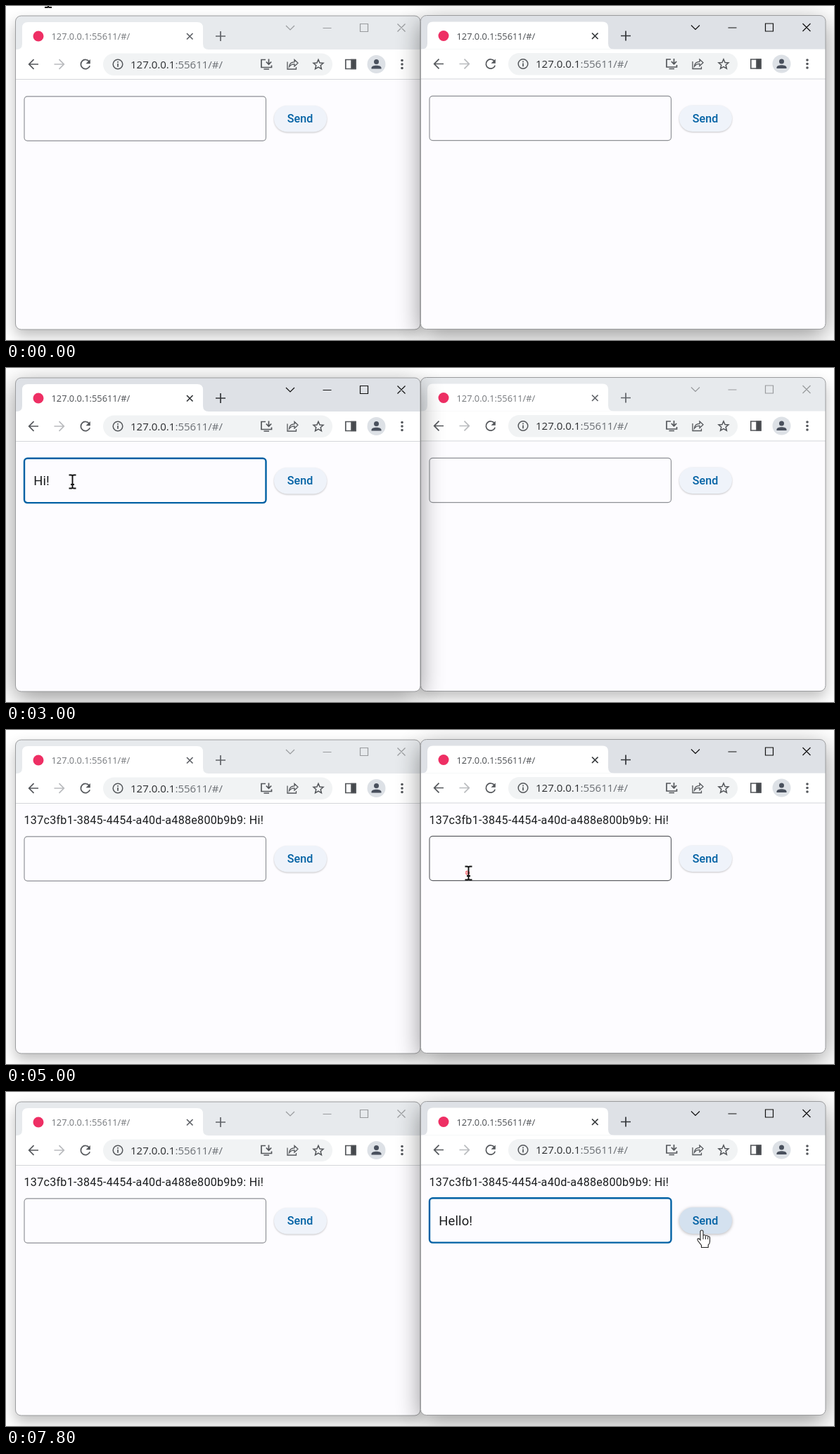
Animation, 1177 px wide and 476 px high, one loop 8000 ms. Source, as an HTML page:

```html
<!DOCTYPE html>
<html lang="en">
<head>
<meta charset="utf-8">
<title>Chat in two windows</title>
<style>
  html, body { margin: 0; width: 100%; height: 100%; overflow: hidden; background: #fff; }
  svg { display: block; width: 1177px; height: 476px; }
  text { white-space: pre; }
  .shadow { filter: blur(10px); opacity: .26; }
  .active .shadow { filter: blur(17px); opacity: .42; }
  .bar { fill: #e7eaed; }
  .active .bar { fill: #dee1e6; }
  .icon { fill: none; stroke: #54575b; stroke-width: 1.7; }
  .ctl { fill: none; stroke: #999b9e; stroke-width: 1.2; }
  .active .ctl { stroke: #111; }
  .tabmark { fill: none; stroke: #606368; stroke-width: 1.7; }
  .active .tabmark { stroke: #333639; }
  .url { font-family: "Open Sans", "Noto Sans", sans-serif; }
  .tabtext { font-size: 12.8px; fill: #74777b; }
  .active .tabtext { fill: #4a4d51; }
  .address { font-size: 15px; fill: #6a6e73; }
  .host { fill: #2b2d30; }
  .app { font-family: Roboto, "Noto Sans", sans-serif; fill: #1a1c1e; }
  .message { font-size: 16.1px; letter-spacing: .27px; }
  .typed { font-size: 18.4px; letter-spacing: .17px; }
  .label { font-size: 16.1px; font-weight: 500; letter-spacing: .1px; fill: #0061a4; }
  .field { fill: none; stroke: #8e9095; stroke-width: 1.15; }
  .field.hover { stroke: #5f6166; }
  .field.focus { stroke: #0061a4; stroke-width: 2.4; }
  .caret { fill: #0061a4; }
  .button { fill: #eff3fa; filter: drop-shadow(0 1px 1px rgba(0, 0, 0, .22)); }
  .button.hover { fill: #d4e1ef; filter: drop-shadow(0 1.5px 2px rgba(0, 0, 0, .28)); }
  .ripple { fill: #ff5a62; fill-opacity: .5; stroke: #f0323c; stroke-width: 1; stroke-dasharray: 3 1.5; }
</style>
</head>
<body>
<svg id="stage" viewBox="0 0 1177 476" xmlns="http://www.w3.org/2000/svg">
  <defs>
    <g id="chrome">
      <circle cx="46" cy="43" r="7.5" fill="#ee2f64"/>
      <g class="icon">
        <path d="M46 83H33M39.5 76.2L32.7 83L39.5 89.8"/>
        <path d="M68.500 83H82M75.500 76.200L82.300 83L75.500 89.800" stroke="#b9bbbe"/>
        <path d="M118.300 79.200A6.600 6.600 0 1 0 119.200 85.200"/>
        <path d="M119.800 76v6.300h-6.300z" fill="#54575b" stroke="none"/>
        <circle cx="159" cy="83" r="6.800" stroke-width="1.500"/>
        <path d="M159 82v4.800M159 79v1.700"/>
        <path d="M369 76.500H363V87.500H377.500V84.500M366.500 90H374" />
        <path d="M373.500 75.500V82.500M369.800 79.500L373.500 83.200L377.200 79.500"/>
        <path d="M400 79.500V90H412.500V87M402.500 86.500C403 82 406 79.800 410 79.800V76.500L415 81.300L410 86V82.800C406.500 82.800 404.300 84 402.500 86.500Z" stroke-width="1.300"/>
        <path d="M444 76.300L446 81L451 81.400L447.200 84.700L448.400 89.600L444 87L439.600 89.600L440.800 84.700L437 81.400L442 81Z" stroke-width="1.500"/>
        <path d="M482.800 76.500H496.800V89.500H482.800Z"/>
        <path d="M491 76.500H497V89.500H491Z" fill="#45484c"/>
      </g>
      <circle cx="526.500" cy="83" r="13" fill="#dde1e6"/>
      <circle cx="526.500" cy="79.500" r="3.500" fill="#49505d"/>
      <path d="M519.500 89.500V88C519.500 83.500 533.500 83.500 533.500 88V89.500Z" fill="#49505d"/>
      <g fill="#54575b">
        <circle cx="563" cy="77.500" r="1.800"/>
        <circle cx="563" cy="83" r="1.800"/>
        <circle cx="563" cy="88.500" r="1.800"/>
      </g>
    </g>
    <g id="beam">
      <path id="stem" d="M-5 -9.500H-2Q0 -9.500 0 -8Q0 -9.500 2 -9.500H5M0 -8V8M-5 9.500H-2Q0 9.500 0 8Q0 9.500 2 9.500H5M-2.500 4H2.500" fill="none" stroke="#111" stroke-width="1.900"/>
    </g>
    <g id="arrow">
      <path d="M.5 .5V18.300L4.600 14.500L7.700 21.500L10.600 20.200L7.600 13.400H13.400Z" fill="#fff" stroke="#222" stroke-width="1"/>
    </g>
    <g id="hand">
      <path d="M-1.500 14V2Q-1.500 0 .5 0Q2.500 0 2.500 2V8Q2.500 6.800 4.200 6.800Q6 6.800 6 8.800Q6 7.500 7.600 7.500Q9.200 7.500 9.200 9.500Q9.500 8.700 10.500 8.700Q12 8.700 12 10.800V16Q12 19 9.700 21V24.500H0V21.500L-5 15Q-6.200 13 -5 12Q-3.500 11.200 -1.500 14Z" fill="#fff" stroke="#222" stroke-width="1.100"/>
      <path d="M2.500 8V13M6 9V13M9.200 10V13" stroke="#222" fill="none"/>
    </g>
  </defs>
  <g id="windows"></g>
  <circle id="ripple" class="ripple"/>
  <use id="pointer"/>
</svg>
<script>
const LOOP = 8000, STEP = 200;
const MESSAGE = "137c3fb1-3845-4454-a40d-a488e800b9b9: Hi!";
const byId = id => document.getElementById(id);
const layer = byId("windows"), ripple = byId("ripple"), pointer = byId("pointer");

function makeWindow(x, y, id) {
  const g = document.createElementNS("http://www.w3.org/2000/svg", "g");
  g.setAttribute("transform", `translate(${x} ${y})`);
  g.innerHTML = `
    <rect class="shadow" x="13" y="23" width="576" height="447" rx="8"/>
    <clipPath id="${id}"><rect x="13.500" y="14" width="575.500" height="447" rx="8"/></clipPath>
    <g clip-path="url(#${id})">
      <rect x="13" y="13" width="577" height="449" fill="#fdfcff"/>
      <rect class="bar" x="13" y="13" width="577" height="50"/>
      <path d="M15 62Q23 62 23 54V31Q23 23 31 23H272Q280 23 280 31V54Q280 62 288 62Z" fill="#fff"/>
      <rect x="13" y="62" width="577" height="42" fill="#fff"/>
      <rect x="13" y="104" width="577" height="1" fill="#d5d7da"/>
      <rect x="138" y="67.500" width="326" height="31.500" rx="15.750" fill="#f1f3f4"/>
    </g>
    <use href="#chrome"/>
    <path class="tabmark" d="M257 39L265.500 47.500M265.500 39L257 47.500M298 43H312M305 36V50"/>
    <path class="ctl" d="M398 28L404 34L410 28M450.500 31.500H462.500M503.500 25.500H514.500V36.500H503.500ZM556.500 25.500L567.500 36.500M567.500 25.500L556.500 36.500"/>
    <text class="url tabtext" x="64.500" y="48">127.0.0.1:55611/#/</text>
    <text class="url address" x="177" y="88.500"><tspan class="host">127.0.0.1</tspan>:55611/#/</text>
    <text class="app message" x="25.500" y="134"></text>
    <g class="form">
      <rect class="field" x="26" y="128.800" width="343.500" height="63.300" rx="4.500"/>
      <text class="app typed" x="39.200" y="167"></text>
      <rect class="caret" y="145.500" width="2.200" height="27.500"/>
      <rect class="button" x="381" y="142" width="75" height="37.500" rx="18.750"/>
      <text class="app label" x="399.700" y="166.300">Send</text>
    </g>
    <rect x="13.500" y="14" width="575.500" height="447" rx="8" fill="none" stroke="#9b9c9e"/>`;
  layer.append(g);
  const part = name => g.querySelector("." + name);
  return { g, message: part("message"), form: part("form"), field: part("field"),
           typed: part("typed"), caret: part("caret"), button: part("button") };
}

const left = makeWindow(0, 0, "clipLeft");
const right = makeWindow(576, -.5, "clipRight");

// [start, shape, x, y]
const pointerSteps = [
  [0, "beam", 60, -7.5], [400, "arrow", 76, 70], [600, "beam", 86, 167],
  [3000, "beam", 94.5, 162], [3200, "beam", 290, 158], [3400, "hand", 443, 154],
  [3800, "arrow", 496, 159], [4000, "arrow", 572, 174], [4200, "beam", 661, 198],
  [4400, "beam", 657.5, 204], [7600, "beam", 850, 200], [7800, "hand", 988.500, 197]
];
const clicks = [[800, 84.5, 167], [3600, 443.5, 154], [5000, 656, 203.5]];

// [start, typed text]
const leftTyping = [[0, ""], [1800, "H"], [2000, "Hi"], [2400, "Hi!"], [3800, ""]];
const rightTyping = [[0, ""], [5800, "H"], [6000, "He"], [6200, "Hel"],
                     [6400, "Hell"], [6600, "Hello"], [7000, "Hello!"]];

// [start, end] spans
const leftCaret = [[1000, 1400], [1800, 3000]];
const rightCaret = [[5200, 5600], [5800, 7600]];

const at = (table, t) => table.filter(row => row[0] <= t).pop();
const within = (t, a, b) => t >= a && t < b;

function put(node, attrs) {
  for (const key in attrs) node.setAttribute(key, attrs[key]);
}

function showWindow(win, state) {
  win.g.setAttribute("class", state.active ? "active" : "");
  win.message.textContent = state.sent ? MESSAGE : "";
  win.form.setAttribute("transform", `translate(0 ${state.sent ? 23 : 0})`);
  win.field.setAttribute("class", "field " + (state.focus ? "focus" : state.over ? "hover" : ""));
  win.button.setAttribute("class", "button " + (state.hover ? "hover" : ""));
  win.typed.textContent = state.text;
  const width = state.text ? win.typed.getComputedTextLength() : 0;
  put(win.caret, { x: 39.2 + width, visibility: state.caret ? "visible" : "hidden" });
}

function draw(t) {
  const sent = t >= 3800;
  const leftActive = within(t, 800, 5000);
  const front = leftActive ? left : right;
  if (layer.lastChild !== front.g) layer.append(front.g);

  showWindow(left, {
    active: leftActive, sent,
    text: at(leftTyping, t)[1],
    over: within(t, 600, 1000),
    focus: within(t, 1000, 3800),
    hover: within(t, 3400, 4200),
    caret: leftCaret.some(span => within(t, ...span))
  });
  showWindow(right, {
    active: !leftActive, sent,
    text: at(rightTyping, t)[1],
    over: within(t, 5000, 5200),
    focus: t >= 5200,
    hover: t >= 7800,
    caret: rightCaret.some(span => within(t, ...span))
  });

  const click = clicks.find(c => within(t, c[0], c[0] + 3 * STEP));
  ripple.setAttribute("visibility", click ? "visible" : "hidden");
  if (click) {
    const n = (t - click[0]) / STEP;
    put(ripple, { cx: click[1], cy: click[2], r: 2.7 + 4.9 * n, opacity: 1 - .1 * n * (n + 1) });
  }

  const [, shape, x, y] = at(pointerSteps, t);
  put(pointer, { href: "#" + shape, x, y });
}

const start = performance.now();
let shown = -1;
function tick() {
  const t = Math.floor((performance.now() - start) % LOOP / STEP) * STEP;
  if (t !== shown) draw(shown = t);
  requestAnimationFrame(tick);
}
tick();
</script>
</body>
</html>
```
